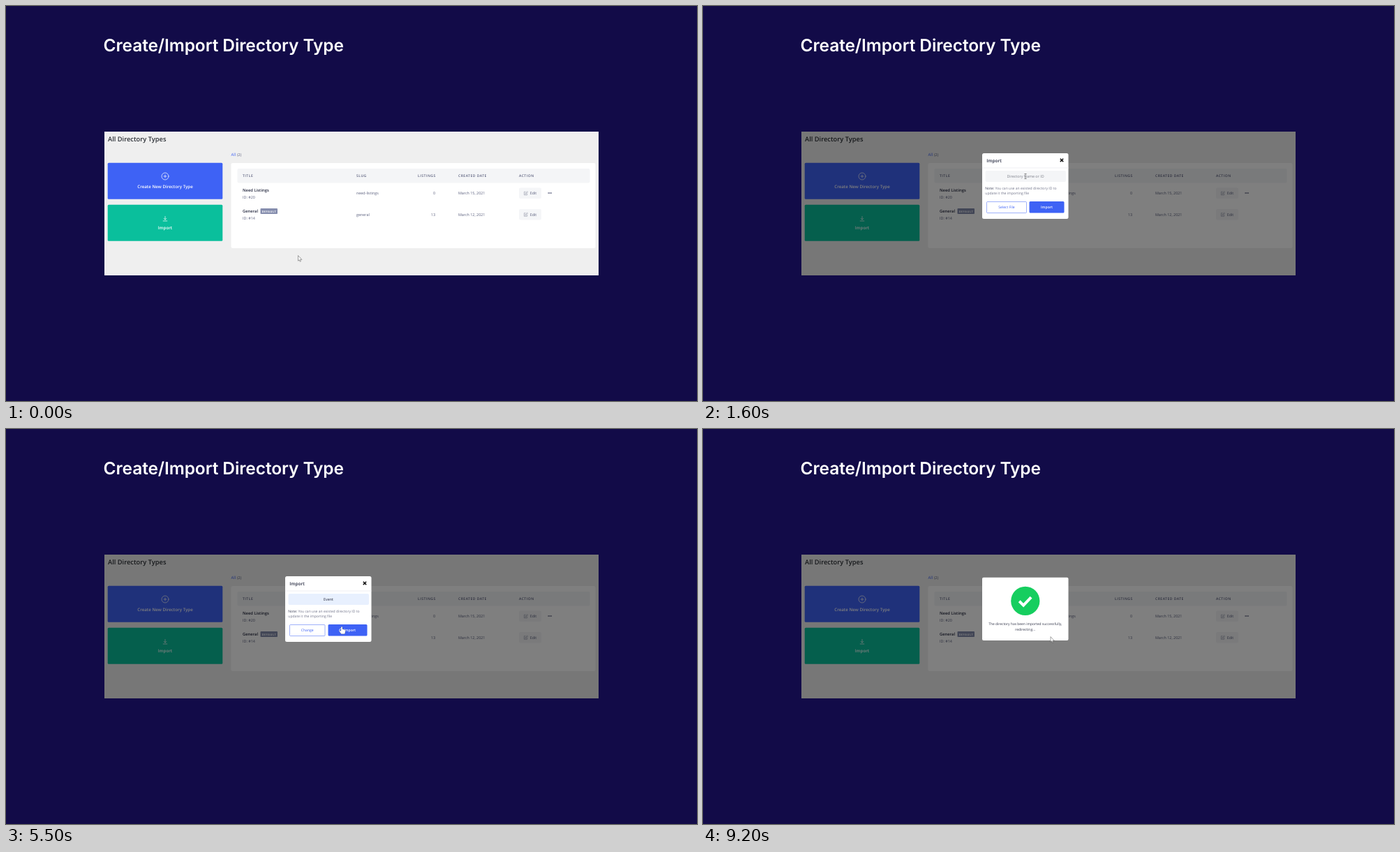
Recreate the animation shown at these times as an HTML page. Size 990 px wide and 566 px high, loop 9300 ms.

```html
<!DOCTYPE html>
<html lang="en">
<head>
<meta charset="utf-8">
<title>Create/Import Directory Type</title>
<style>
  html, body { margin: 0; width: 100%; height: 100%; overflow: hidden; background: #120b48; }
  svg { display: block; width: 100%; height: 100%; }
  text { font-family: "Open Sans", "Noto Sans", sans-serif; font-size: 5.4px; fill: #5a5f7d; text-rendering: geometricPrecision; }
  .title { font: 600 24.5px Inter, "Open Sans", sans-serif; fill: #fff; letter-spacing: -.1px; }
  .heading { font-size: 9.3px; font-weight: 600; fill: #2c3036; }
  .card { font-size: 6.2px; font-weight: 600; fill: #fff; }
  .head text { font-size: 5px; font-weight: 600; letter-spacing: .5px; }
  .name { font-size: 5.85px; font-weight: 600; fill: #272b41; }
  .badge { font-size: 3.8px; font-weight: 700; letter-spacing: .55px; fill: #fff; }
  .mid { text-anchor: middle; }
  .end { text-anchor: end; }
  .label { font-size: 5.1px; text-anchor: middle; }
  .small { font-size: 5.05px; fill: #71748a; }
  .done { font-size: 4.95px; fill: #33364a; text-anchor: middle; }
  .line { fill: none; stroke-linecap: round; stroke-linejoin: round; }
</style>
</head>
<body>
<svg viewBox="0 0 990 566">
  <defs>
    <g id="edit">
      <rect width="32" height="15.5" rx="2" fill="#f5f6f8"/>
      <path class="line" d="M9.2 5.7H7.4v4.6h4.2V8.4M9 8.7l.2-1 2.5-2.6.8.8L10 8.5z" stroke="#70748c" stroke-width=".45"/>
      <text x="15.7" y="9.7">Edit</text>
    </g>
  </defs>

  <text class="title" x="139.5" y="65.2">Create/Import Directory Type</text>

  <rect x="141" y="180" width="708" height="206" fill="#efefef"/>
  <text class="heading" x="146" y="194">All Directory Types</text>
  <text x="322.5" y="215" style="font-size:5.8px;fill:#3e62f5;font-weight:500">All</text>
  <text x="331" y="215">(2)</text>

  <rect x="145.7" y="224.7" width="164.6" height="52" rx="1.5" fill="#3e62f5"/>
  <g class="line" stroke="#fff" stroke-width=".7">
    <circle cx="228" cy="244" r="5"/>
    <path d="M226 244h4M228 242v4"/>
  </g>
  <text class="card mid" x="228" y="261.2">Create New Directory Type</text>

  <rect x="145.7" y="284.7" width="164.6" height="52" rx="1.5" fill="#0abf9c"/>
  <path class="line" d="M228 301.5v4.5M226.2 304.4l1.8 1.8 1.8-1.8M225.2 308h5.6" stroke="#fff" stroke-width=".7"/>
  <text class="card mid" x="228" y="320.3">Import</text>

  <rect x="322.5" y="225" width="522" height="122" rx="2" fill="#fff"/>
  <rect x="331.5" y="233" width="505" height="20.5" rx="2" fill="#f4f5f7"/>
  <g class="head">
    <text x="339" y="245.2">TITLE</text>
    <text x="502" y="245.2">SLUG</text>
    <text class="end" x="615.7" y="245.2">LISTINGS</text>
    <text x="648" y="245.2">CREATED DATE</text>
    <text x="735" y="245.2">ACTION</text>
  </g>

  <text class="name" x="339" y="266">Need Listings</text>
  <text x="339" y="275.7">ID: #20</text>
  <text x="502" y="270.2">need-listings</text>
  <text class="end" x="615" y="270.2">0</text>
  <text x="648" y="270.2">March 15, 2021</text>
  <use href="#edit" x="735" y="260.5"/>
  <path d="M776.5 268h5.4" stroke="#5a5f7d" stroke-width="1.4" stroke-dasharray="1.4 .6"/>

  <text class="name" x="339" y="296">General</text>
  <rect x="364.5" y="290" width="24.5" height="8" rx="1" fill="#868eae"/>
  <text class="badge mid" x="377" y="295.5">DEFAULT</text>
  <text x="339" y="306.2">ID: #14</text>
  <text x="502" y="300.7">general</text>
  <text class="end" x="615" y="300.7">13</text>
  <text x="648" y="300.7">March 12, 2021</text>
  <use href="#edit" x="735" y="291"/>

  <rect id="shade" x="141" y="180" width="708" height="206" opacity=".5"/>

  <g id="dialog">
    <rect x="400" y="211" width="123.5" height="94" rx="2.5" fill="#fff"/>
    <text x="406.3" y="224.2" style="font-size:6.5px;font-weight:600;fill:#272b41">Import</text>
    <path d="M511.8 218.7l4.4 4.4m0-4.4l-4.4 4.4" stroke="#111" stroke-width="1.5"/>
    <path d="M400 232h123.5" stroke="#e8e9ee" stroke-width=".7"/>
    <rect id="field" x="404.5" y="236" width="115.5" height="16" rx="2"/>
    <text id="value" class="mid" x="462" y="246.1"></text>
    <path id="caret" d="M469.2 240.3v7.4" stroke="#111" stroke-width=".8"/>
    <text class="small" x="404.3" y="262.7"><tspan fill="#3c4058">Note:</tspan> You can use an existed directory ID to</text>
    <text class="small" x="404.3" y="270.2">update it the importing file</text>
    <rect id="fileBox" x="406.5" y="280.5" height="16" rx="1" stroke="#3e62f5" stroke-width=".5"/>
    <text id="fileText" class="label" y="290.3"></text>
    <rect id="goBox" y="280" height="16.5" rx="1.5" fill="#3e62f5"/>
    <text id="goText" class="label" y="290.3" style="fill:#fff;font-weight:600">Import</text>
    <path id="spinner" class="line" d="M1.3-2.2A2.5 2.5 0 1 1-1.3-2.2" stroke="#fff" stroke-width=".8"/>
  </g>

  <g id="success">
    <rect x="400" y="212.7" width="123.5" height="90.3" rx="2" fill="#fff"/>
    <circle cx="461.8" cy="246.4" r="20.6" fill="#16ce5f"/>
    <path d="M453.2 246.8l5.9 5.8 11-11.4" fill="none" stroke="#fff" stroke-width="4"/>
    <text class="done" x="461.7" y="281">The directory has been imported successfully,</text>
    <text class="done" x="461.7" y="288.6">redirecting...</text>
  </g>

  <g id="cursor" class="line" stroke="#333" stroke-width=".45">
    <path id="arrow" fill="#fff" d="M0 0v7.2l1.6-1.4 1.2 2.5 1.1-.5-1.1-2.4h2.2z"/>
    <path id="hand" fill="#fff" stroke-width=".25" d="M-1 5V.8a1 1 0 0 1 2 0v2.6q1.1-.5 1.6.3 1-.4 1.4.5 1.1-.2 1.1.9v2.2q0 1.2-.9 2.9h-4.8L-3.6 6.5q.2-1.4 1.6-.6z"/>
    <path id="beam" d="M-1.3-3.5h2.6M0-3.5v7M-1.3 3.5h2.6"/>
  </g>
</svg>

<script>
const LOOP = 9300, STEP = 100;
const el = id => document.getElementById(id);
const show = (id, on) => el(id).style.display = on ? "" : "none";
const set = (id, attrs) => {
  for (const name in attrs) el(id).setAttribute(name, attrs[name]);
};

// time, x, y of the pointer's hot spot
const path = [
  [0, 418.5, 358], [500, 230.5, 310.5], [900, 230.5, 310.5],
  [1600, 462, 244], [2200, 462, 244], [2600, 437, 288.5],
  [4500, 437, 288.5], [4600, 410, 230], [5400, 481, 283.5], [5500, 481, 283.5],
  [6300, 590, 364], [6900, 594.5, 325], [7500, 600, 356],
  [8700, 600, 356], [9200, 498, 298], [LOOP, 498, 298]
];
// time, pointer shape
const shapes = [
  [0, "arrow"], [400, "hand"], [1000, "arrow"], [1500, "beam"], [2400, "arrow"],
  [2500, "hand"], [4600, "arrow"], [5300, "hand"], [5700, "arrow"]
];

const ease = p => p * p * (3 - 2 * p);
const clamp = v => Math.min(1, Math.max(0, v));

function pointerAt(t) {
  const i = path.findIndex(k => k[0] > t);
  const [t0, x0, y0] = path[i - 1], [t1, x1, y1] = path[i];
  const p = ease((t - t0) / (t1 - t0));
  return [x0 + (x1 - x0) * p, y0 + (y1 - y0) * p];
}

function drawField(t) {
  const filled = t >= 2000;
  el("value").textContent = filled ? "Event" : t >= 1800 ? "E" : "Directory Name or ID";
  el("value").style.fill = t >= 1800 ? "#23263a" : "#7d7f8a";
  set("field", { fill: filled ? "#e8f0fe" : "#f4f5f7" });
  show("caret", filled && t < 3100);
}

function drawButtons(t) {
  const chosen = t >= 4600, loading = t >= 5400;
  const fileWidth = loading ? 50.5 : chosen ? 54 : 57;
  const goX = loading ? 461.5 : chosen ? 464.5 : 467.5;
  const fill = loading ? 0 : chosen ? 1 : clamp((t - 2400) / 300);
  set("fileBox", { width: fileWidth, fill: "#3e62f5", "fill-opacity": fill });
  set("fileText", { x: 406.5 + fileWidth / 2 });
  el("fileText").textContent = chosen ? "Change" : "Select File";
  el("fileText").style.fill = fill > .5 ? "#fff" : "#3e62f5";
  set("goBox", { x: goX, width: 517.5 - goX });
  set("goText", { x: loading ? 492.6 : (goX + 517.5) / 2 });
  show("spinner", loading);
  set("spinner", { transform: `translate(480.2 288.3) rotate(${(t - 6900) * .36 - 20})` });
}

function draw(t) {
  const open = t >= 700, done = t >= 8400;
  show("shade", open);
  show("dialog", open && !done);
  show("success", done);
  drawField(t);
  drawButtons(t);
  const shape = shapes.filter(s => s[0] <= t).pop()[1];
  for (const id of ["arrow", "hand", "beam"]) show(id, id === shape);
  set("cursor", { transform: `translate(${pointerAt(t)})` });
}

function frame() {
  draw(Math.floor(performance.now() % LOOP / STEP) * STEP);
  requestAnimationFrame(frame);
}
frame();
</script>
</body>
</html>
```
